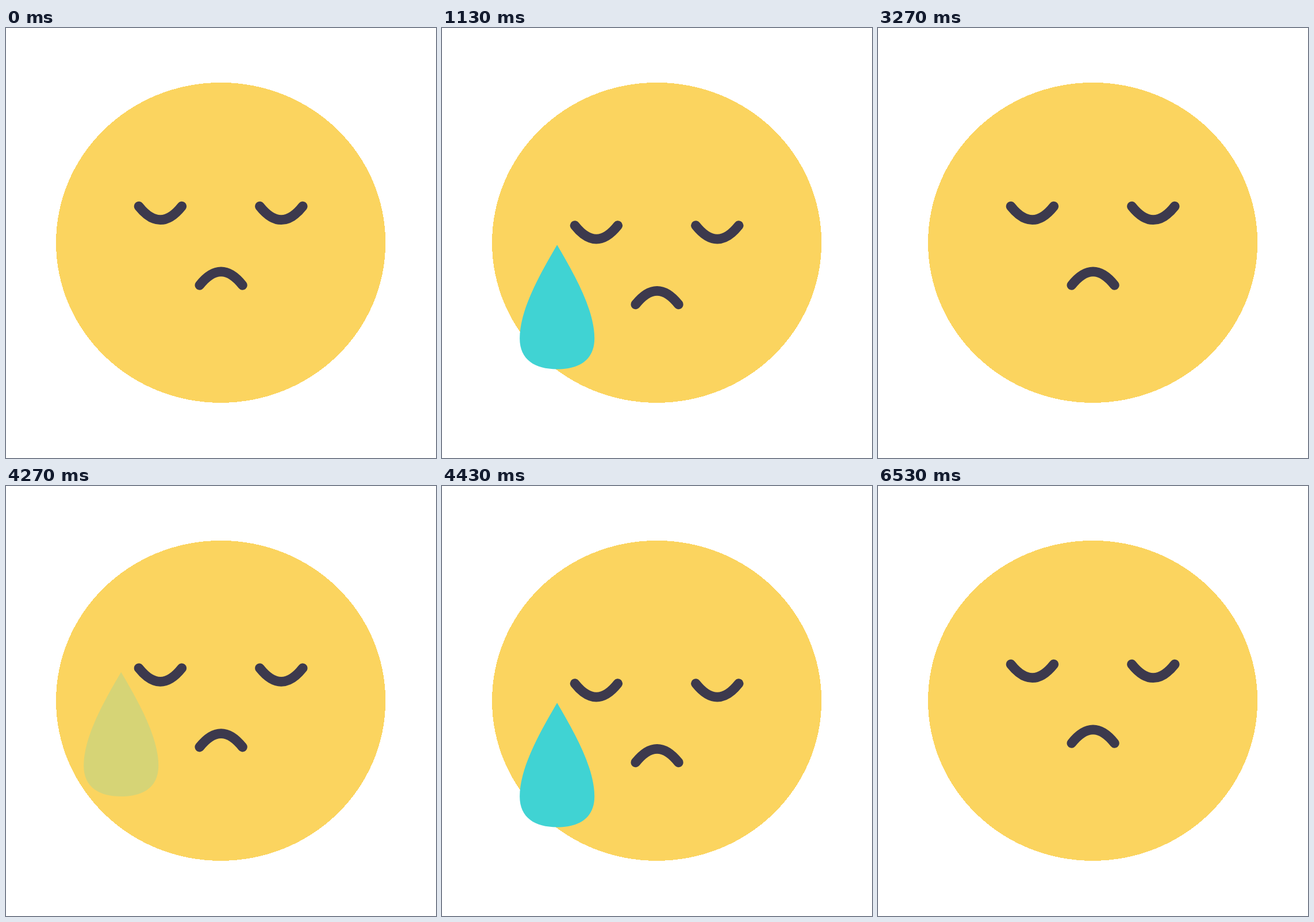
Write an HTML page without scripts that moves like this. It is 748 px wide and 748 px high and loops after 6570 ms.

```html
<!DOCTYPE html>
<html lang="en">
<head>
<meta charset="utf-8">
<title>Sad face</title>
<style>
  @property --sad { syntax: "<number>"; inherits: true; initial-value: 0; }
  @property --fall { syntax: "<number>"; inherits: true; initial-value: 0; }

  html, body { margin: 0; width: 100%; height: 100%; overflow: hidden; background: #fff; }

  svg {
    display: block;
    width: 100%;
    height: 100%;
    animation: sad 6570ms -3ms step-end infinite, fall 6570ms -3ms step-end infinite;
  }

  .head { fill: #fbd45f; shape-rendering: crispEdges; }
  .features {
    fill: none;
    stroke: #3c394d;
    stroke-width: 16.8;
    stroke-linecap: round;
    transform: translateY(calc(var(--sad) * 33.4px));
  }
  .tear {
    fill: #40d3d3;
    opacity: var(--sad);
    transform: translateY(calc((var(--fall) - 1) * 66.8px));
  }

  /* the face sinks and rises twice, in fifths */
  @keyframes sad {
    0% { --sad: 0; }
    14.764%, 64.992% { --sad: .2; }
    15.373%, 65.449% { --sad: .4; }
    15.982%, 66.134% { --sad: .6; }
    16.591%, 66.819% { --sad: .8; }
    17.199%, 67.428% { --sad: 1; }
    47.184%, 96.956% { --sad: .8; }
    47.641%, 97.869% { --sad: .6; }
    48.402%, 98.402% { --sad: .4; }
    49.011%, 98.935% { --sad: .2; }
    49.772%, 99.391%, 100% { --sad: 0; }
  }

  /* the tear only drops; it fades out where it landed */
  @keyframes fall {
    0% { --fall: 0; }
    14.764%, 64.992% { --fall: .2; }
    15.373%, 65.449% { --fall: .4; }
    15.982%, 66.134% { --fall: .6; }
    16.591%, 66.819% { --fall: .8; }
    17.199%, 67.428%, 100% { --fall: 1; }
  }
</style>
</head>
<body>
<svg viewBox="0 0 748 748">
  <ellipse class="head" cx="373.6" cy="373.4" rx="286.6" ry="278.5"/>
  <g class="features">
    <path d="M231.1 310.2q37.3 47 74.6 0"/>
    <path d="M441.5 310.2q37.3 47 74.6 0"/>
    <path d="M336.8 447.4q37.3 -47 74.6 0"/>
  </g>
  <path class="tear" d="M200.2 377.3C230 428 265.2 490 265.2 540C265.2 577 239 593.4 200.2 593.4C161.4 593.4 135.2 577 135.2 540C135.2 490 170.4 428 200.2 377.3Z"/>
</svg>
</body>
</html>
```
